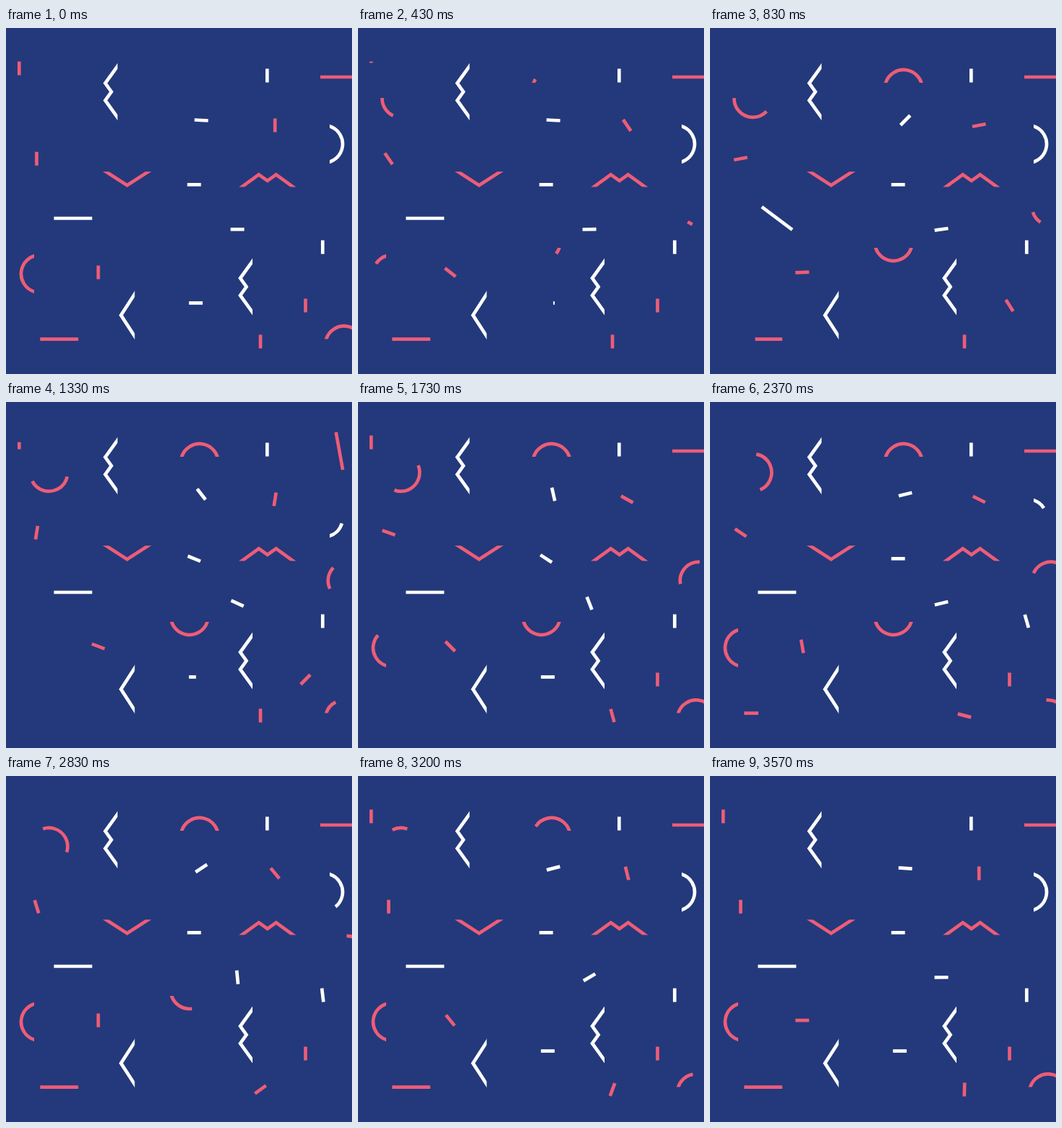
Recreate the animation shown at these times as an HTML page with a canvas. Size 480 by 480 pixels, loop 3610 ms.

```html
<!DOCTYPE html>
<html lang="en">
<head>
<meta charset="utf-8">
<title>Confetti shapes</title>
<style>
html, body { margin: 0; width: 100%; height: 100%; overflow: hidden; background: #23397b; }
canvas { display: block; }
</style>
</head>
<body>
<canvas id="stage" width="480" height="480"></canvas>
<script>
const ctx = document.getElementById('stage').getContext('2d');
const LOOP = 3610, WHITE = '#fff', RED = '#ee5c77', BLUE = '#23397b';
const TICK = 19, LINE = 53, RADIUS = 26;
const rad = deg => deg * Math.PI / 180;
let now = 0;

// Eased progress from 0 to 1 between two times.
function ease(start, end) {
  const u = Math.min(1, Math.max(0, (now - start) / (end - start)));
  return u * u * (3 - 2 * u);
}

// An angle followed by eased turns: [start, end, degrees].
function turned(angle, ...turns) {
  return turns.reduce((sum, [start, end, by]) => sum + by * ease(start, end), angle);
}

function place(x, y, deg, color, draw) {
  ctx.save();
  ctx.translate(x, y);
  ctx.rotate(rad(deg));
  ctx.strokeStyle = color;
  ctx.beginPath();
  draw();
  ctx.stroke();
  ctx.restore();
}

// Shapes standing on a base line are cut flat along it.
function cutAtBase() {
  ctx.rect(-60, -60, 120, 60);
  ctx.clip();
  ctx.beginPath();
}

function bar(x, y, length, deg, color, from = 0, to = 1) {
  place(x, y, deg, color, () => {
    ctx.moveTo((from - 0.5) * length, 0);
    ctx.lineTo((to - 0.5) * length, 0);
  });
}

function roof(x, y, deg, color) {
  place(x, y, deg, color, () => {
    cutAtBase();
    for (const side of [-1, 0, 1]) ctx.lineTo(side * 35.5, side ? 4 : -19);
  });
}

function mountain(x, y, deg, color) {
  place(x, y, deg, color, () => {
    cutAtBase();
    ctx.moveTo(-41, 4);
    for (const side of [-1, 0, 1]) ctx.lineTo(side * 12, side ? -17 : -8.5);
    ctx.lineTo(41, 4);
  });
}

function bow(x, y, deg, color, from, to) {
  place(x, y, deg, color, () => {
    cutAtBase();
    ctx.arc(0, 8, RADIUS, rad(194 + 152 * from), rad(194 + 152 * to));
  });
}

function sweep(x, y, color, tail, head) {
  if (Math.abs(head - tail) < 0.5) return;
  place(x, y, 0, color, () => ctx.arc(0, 0, RADIUS, rad(tail), rad(head), head < tail));
}

// Draws a stroke on over [on, onEnd], then wipes it off over [off, offEnd].
function wipe(draw, on, onEnd, off = LOOP, offEnd = LOOP + 1) {
  const from = ease(off, offEnd), to = ease(on, onEnd);
  if (to > from) draw(from, to);
}

// A stroke that is whole when the loop starts.
const wipeOff = (draw, off, offEnd) => wipe(draw, -2, -1, off, offEnd);

function drawFixed() {
  mountain(154.7, 88.5, -90, WHITE);
  mountain(342, 359, -90, WHITE);
  mountain(362.7, 220.4, 0, RED);
  roof(178.5, 398.4, -90, WHITE);
  roof(168, 199.3, 180, RED);
  bar(362.3, 66, TICK, 90, WHITE);
}

function drawSpinners() {
  const halfTurn = [0, 1540, -180];
  bar(42.5, 181.3, TICK, turned(90, halfTurn, [1330, 1800, -75], [1950, 3230, 75]), RED);
  bar(373.2, 135, TICK, turned(90, halfTurn, [1330, 1800, -65], [2250, 3600, 65]), RED);
  bar(128, 339, TICK, turned(90, [0, 830, -98], [500, 2830, 98], [2900, 3560, -90]), RED);
  bar(415.5, 385, TICK, turned(90, [500, 1730, -180]), RED);
  bar(353, 435, TICK, turned(90, [1300, 3700, -180]), RED);

  bar(271, 128, TICK, turned(3, [450, 1380, -132], [1430, 2400, 115],
    [2400, 2830, -19], [2850, 3550, 37]), WHITE);
  bar(261, 217.3, TICK, turned(0, [900, 1600, 33], [1750, 2330, -33]), WHITE);
  bar(321, 279.3, TICK, turned(0, [300, 830, -8], [950, 1750, 70], [1550, LOOP, 298]), WHITE);
  bar(439.3, 304, TICK, turned(90, [1900, 2370, -16], [2370, 3200, 16]), WHITE);

  bar(93, 264, LINE, turned(0, [685, 1185, 180]), WHITE);
  bar(462.5, 68, LINE, turned(0, [1100, 1600, 180]), RED);
}

function drawWipes() {
  const ticks = (a, b) => {
    bar(18.3, 56, TICK, -90, RED, a, b);
    bar(263.3, 381.5, TICK, 0, WHITE, a, b);
  };
  wipeOff(ticks, 30, 530);
  wipe(ticks, 1050, 1600, 1880, 2370);
  wipe(ticks, 2850, 3210);

  const line = (a, b) => bar(73.8, 431.7, LINE, 0, RED, a, b);
  wipeOff(line, 600, 1250);
  wipe(line, 2130, 2710);

  const leftBow = (a, b) => bow(39, 341, -90, RED, a, b);
  wipeOff(leftBow, 30, 650);
  wipe(leftBow, 1300, 1920);

  const rightBow = (a, b) => bow(449, 161, 90, WHITE, a, b);
  wipeOff(rightBow, 1045, 1545);
  wipe(rightBow, 1950, 3130);

  const cornerBow = (a, b) => bow(469, 431.5, 0, RED, a, b);
  wipeOff(cornerBow, 30, 600);
  wipe(cornerBow, 1080, 1740, 2100, 2670);
  wipe(cornerBow, 2950, 3500);

  wipe((a, b) => bow(268.5, 76, 0, RED, a, b), 330, 830, 3100, 3560);
  wipe((a, b) => bow(254.5, 305, 180, RED, a, b), 300, 820, 2570, 3130);
}

function drawSweeps() {
  sweep(59.5, 97.9, RED,
    turned(182, [800, 2400, -115], [2450, 3570, -184]),
    turned(182, [0, 850, -132], [500, 3200, -167]));
  sweep(472.8, 247.8, RED,
    turned(110, [400, 1800, 60], [1900, 3500, 160]),
    turned(110, [0, 2600, 220]));
}

function frame() {
  now = performance.now() % LOOP;
  ctx.fillStyle = BLUE;
  ctx.fillRect(0, 0, 480, 480);
  ctx.lineWidth = 4.7;
  drawFixed();
  drawSpinners();
  drawWipes();
  drawSweeps();
  requestAnimationFrame(frame);
}
frame();
</script>
</body>
</html>
```
